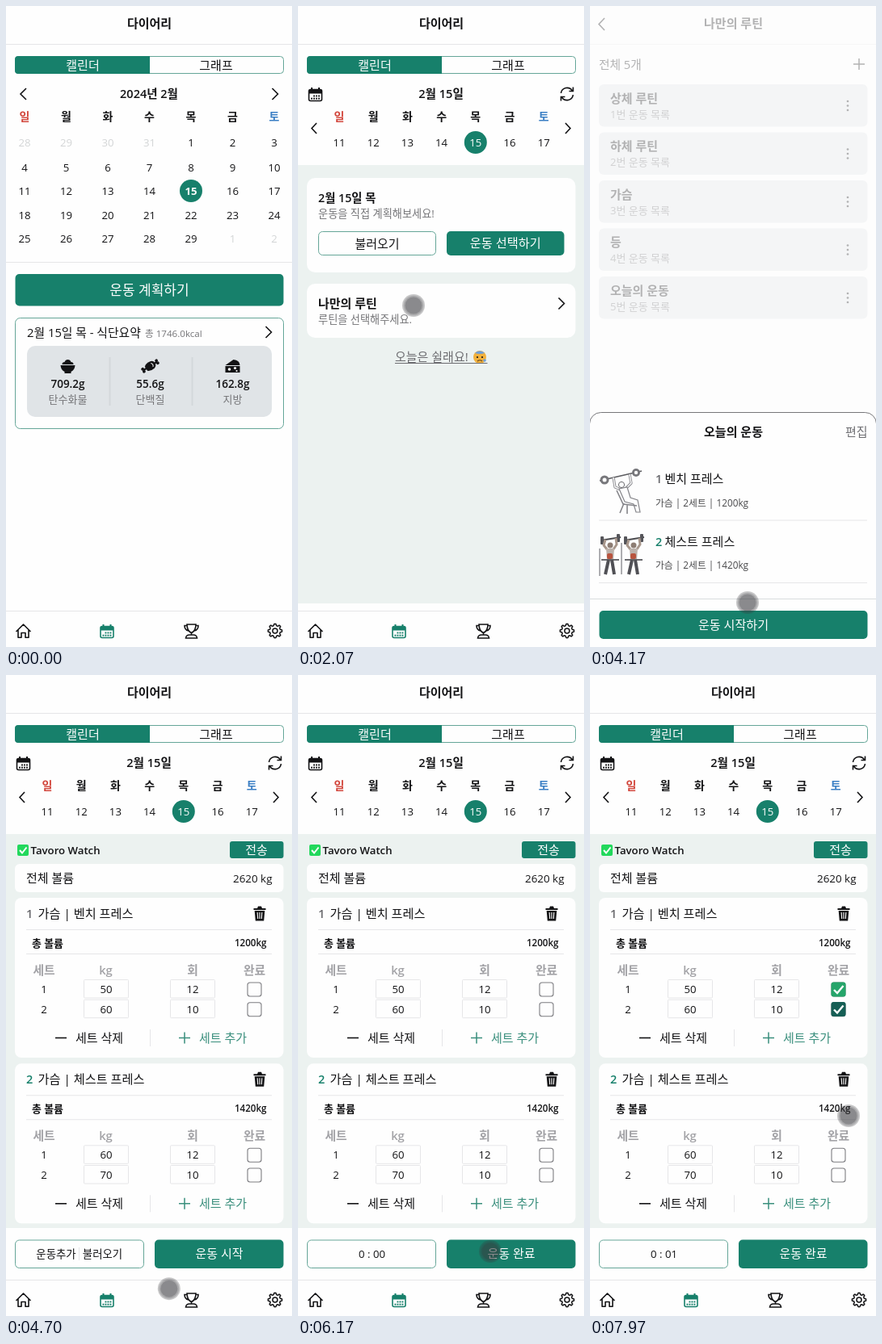
An HTML page for the animation above (8 s loop, 354 px wide and 794 px high).

```html
<!DOCTYPE html>
<html lang="ko">
<head>
<meta charset="utf-8">
<title>다이어리</title>
<style>
html, body { margin: 0; width: 100%; height: 100%; overflow: hidden; background: #fefefe; }
svg { display: block; width: 100%; height: 100%; }
text { font-family: "Open Sans", "Noto Sans CJK KR", "Noto Sans CJK", sans-serif; white-space: pre; }
</style>
</head>
<body>
<svg id="stage" viewBox="0 0 354 794"></svg>
<script>
const BG = '#fefefe', INK = '#131315', GREEN = '#17806b', EDGE = '#65a698', GREY = '#757578',
      PAGE = '#ecf2f0', SOFT = '#e0e4e7', RULE = '#e6e6e8', PALE = '#d3d5d6';
const LOOP = 8000;

// Drawing helpers
const text = (s, x, y, size = 15, fill = INK, weight = 400, anchor = 'start') =>
  `<text x="${x}" y="${y}" font-size="${size}" fill="${fill}" font-weight="${weight}" text-anchor="${anchor}">${s}</text>`;
const mid = (s, x, y, size, fill, weight) => text(s, x, y, size, fill, weight, 'middle');
const end = (s, x, y, size, fill, weight) => text(s, x, y, size, fill, weight, 'end');
const rect = (x, y, w, h, r = 0, fill = BG, stroke = 'none', sw = 1) =>
  `<rect x="${x}" y="${y}" width="${w}" height="${h}" rx="${r}" fill="${fill}" stroke="${stroke}" stroke-width="${sw}"/>`;
const line = (d, stroke = INK, sw = 1.6, extra = '') =>
  `<path d="${d}" fill="none" stroke="${stroke}" stroke-width="${sw}" ${extra}/>`;
const shape = (d, fill = INK) => `<path d="${d}" fill="${fill}"/>`;
const dot = (x, y, r, fill = INK) => `<circle cx="${x}" cy="${y}" r="${r}" fill="${fill}"/>`;
const rule = (x1, x2, y, c = RULE) => line(`M${x1} ${y}H${x2}`, c, 1);
const at = (x, y, s) => `<g transform="translate(${x} ${y})">${s}</g>`;
const many = (n, f) => Array.from({ length: n }, (_, i) => f(i)).join('');
const chevron = (x, y, w, h) => line(`M${x - w / 2} ${y - h}L${x + w / 2} ${y}L${x - w / 2} ${y + h}`);
const button = (s, x, y, w, h, baseline, size = 15) =>
  rect(x, y, w, h, 5, GREEN) + mid(s, x + w / 2, baseline, size, BG);
const plus = (x, y, r, c) => line(`M${x - r} ${y}h${2 * r}M${x} ${y - r}v${2 * r}`, c, 1.5);

// Icons, centred on 0,0
const gearPath = 'M' + Array.from({ length: 48 }, (_, i) => {
  const a = i * Math.PI / 24, r = 7.6 + 1.1 * Math.tanh(2.5 * Math.cos(8 * a));
  return (r * Math.cos(a)).toFixed(2) + ' ' + (r * Math.sin(a)).toFixed(2);
}).join('L') + 'Z';
const gear = line(gearPath, INK, 1.5) + `<circle r="3" fill="none" stroke="${INK}" stroke-width="1.5"/>`;
const home = line('M-9 1L0 -8L9 1M-6.5 -1V8.3H-2.5V2.5H2.5V8.3H6.5V-1', INK, 1.6, 'stroke-linejoin="round"');
const trophy = line('M-5.5 -8H5.5Q5.5 0 0 2.5Q-5.5 0 -5.5 -8ZM-5.5 -6.5H-8.5Q-8.5 -1 -3.5 0M5.5 -6.5H8.5Q8.5 -1 3.5 0M0 2V5M-7 9Q-6.5 5 -2.5 5H2.5Q6.5 5 7 9Z', INK, 1.6);
const calendar = c => rect(-8, -6.5, 16, 14, 2, 'none', c, 1.6) + rect(-8, -6.5, 16, 5, 1, c) +
  line('M-4.5 -9V-5M4.5 -9V-5', c, 2) +
  many(7, i => rect(-5.5 + (i + 1) % 4 * 3, i < 3 ? .5 : 3.7, 1.9, 1.9, 0, c));
const refresh = line('M-7.5 -1A7.6 7.6 0 0 1 6.5 -4M7.5 1A7.6 7.6 0 0 1 -6.5 4M7.5 -8.5V-3.5H2.5M-7.5 8.5V3.5H-2.5');
const trash = shape('M-7.5 -6.5H-3L-2 -9H2L3 -6.5H7.5V-4.5H-7.5ZM-6.3 -3.5H6.3L5.2 9H-5.2Z') +
  line('M-2.8 -1.5L-2.3 6.5M0 -1.5V6.5M2.8 -1.5L2.3 6.5', BG, 1.1);
const rice = shape('M-9 -1H9Q8.5 5 4 7V9H-4V7Q-8.5 5 -9 -1ZM-7 -2Q-7 -5 -4 -5Q-3 -8 0 -8Q3 -8 4 -5Q7 -5 7 -2Z');
const meat = `<g transform="rotate(-32)">${shape('M-6 -3Q-3 -6 3 -5Q7 -4 7 0Q7 4 3 5Q-3 6 -6 3Z')}` +
  line('M-10 0H10', INK, 2.4) + dot(-10, -1.7, 1.9) + dot(-10, 1.7, 1.9) + dot(10, -1.7, 1.9) + dot(10, 1.7, 1.9) +
  line('M2.5 -2.5Q5 0 2.5 2.5', BG, 1) + '</g>';
const cheese = shape('M-9 -1L1 -8Q9 -7 9 -1ZM-9 0H9V8H-9Z') + dot(-4, 4, 1.8, BG) + dot(3, 2.5, 1.6, BG) + dot(5, 6, 1.1, BG);

// Shared parts
const head = title => mid(title, 177.5, 27, 15, INK, 600) + rule(0, 354, 47.5);
const nav = rect(0, 749, 354, 45) + rule(0, 354, 749.5) +
  at(21.5, 774, home) + at(125, 775, calendar(GREEN)) + at(229.5, 774, trophy) + at(333, 774, gear);
const tabs = rect(11.5, 62.5, 332, 21, 4, BG, EDGE) +
  shape('M15 62H178V84H15Q11 84 11 80V66Q11 62 15 62Z', GREEN) +
  mid('캘린더', 95, 78.5, 15, BG) + mid('그래프', 260, 78.5);
const weekdays = (x, step) => [...'일월화수목금토'].map((d, i) =>
  mid(d, x + i * step, 141.5, 14, i == 0 ? '#d2463c' : i == 6 ? '#3b7fc4' : INK, 600)).join('');

const month = head('다이어리') + tabs + chevron(21.5, 109, -7, 7) + chevron(333, 109, 7, 7) +
  mid('2024년 2월', 177, 114, 14.5, INK, 600) + weekdays(23, 51.5) + dot(229, 229, 14, GREEN) +
  many(35, i => {
    const day = i - 3, out = day < 1 || day > 29, today = day == 15;
    return mid(day < 1 ? day + 31 : day > 29 ? day - 29 : day, 23 + i % 7 * 51.5,
      [174, 205, 234, 264, 293][i / 7 | 0], 13.2, today ? BG : out ? PALE : INK, today ? 700 : 400);
  }) +
  rule(0, 354, 317.5) + button('운동 계획하기', 11.5, 332, 332, 39.5, 358, 17) +
  rect(11.5, 386.5, 332, 137, 6, BG, EDGE) +
  text('2월 15일 목 - 식단요약', 26, 409.5, 14.8) + text('총 1746.0kcal', 172, 409.5, 11.6, GREY) +
  chevron(325, 404, 7, 7) + rect(26, 421, 303, 88, 10, SOFT) +
  [['709.2g', '탄수화물', rice], ['55.6g', '단백질', meat], ['162.8g', '지방', cheese]].map(([v, s, icon], i) => {
    const x = 76.5 + i * 102;
    return at(x, 446, icon) + mid(v, x, 473, 13.5, INK, 600) + mid(s, x, 492, 13, GREY);
  }).join('') + line('M128.5 435V495M230.5 435V495', '#d3d8db', 2) + nav;

const weekTop = head('다이어리') + tabs + at(21.5, 110, calendar(INK)) +
  mid('2월 15일', 177, 114, 14.6, INK, 600) + at(333, 109, refresh) +
  weekdays(51, 42.2) + chevron(20, 151.5, -6, 6.5) + chevron(334, 151.5, 6, 6.5) + dot(219.8, 169, 14, GREEN) +
  many(7, i => mid(11 + i, 51 + i * 42.2, 174, 13.2, i == 4 ? BG : INK));

const sweat = dot(225, 435, 8, '#f2b13c') + shape('M219 430A8 8 0 0 1 231 430Q225 432 219 430Z', '#6f9fd8') +
  dot(222, 435, 1.1) + dot(228, 435, 1.1) + line('M222 440Q225 437.5 228 440', '#5d4420', 1.2) + dot(231, 439, 1.8, '#6f9fd8');
const plan = weekTop + rect(0, 197, 354, 543, 0, PAGE) + rect(11, 213, 332.5, 117, 10) +
  text('2월 15일 목', 25, 242.5, 14.3, INK, 600) + text('운동을 직접 계획해보세요!', 25, 262, 13.2, GREY) +
  rect(25.5, 279.5, 145, 29, 5, BG, EDGE) + mid('불러오기', 98, 299.5) +
  button('운동 선택하기', 184, 279, 145.5, 30, 299, 15.2) +
  rect(11, 344, 332.5, 67, 10) + text('나만의 루틴', 25, 374, 15, INK, 600) +
  text('루틴을 선택해주세요.', 25, 392.5, 13.2, GREY) + chevron(326, 368.5, 7, 7) +
  text('오늘은 쉴래요!', 120, 440, 15, '#6c6c70') + sweat + rule(120, 234.5, 442.5, '#6c6c70') + nav;

const list = head('나만의 루틴') + chevron(14.5, 22.5, -7, 7.5) + text('전체 5개', 11, 77.5, 14.7) + plus(333, 72, 7) +
  ['상체 루틴', '하체 루틴', '가슴', '등', '오늘의 운동'].map((s, i) => at(0, i * 59.5,
    rect(11, 97, 332.5, 52.5, 6, SOFT) + text(s, 25, 119.5, 15, INK, 600) +
    text(`${i + 1}번 운동 목록`, 25, 138.5, 13, GREY) + many(3, k => dot(319, 118 + k * 5.5, 1.35)))).join('') + nav;

const bench = line('M12 588L64 576', '#5c5c60', 1.6) + dot(18, 587, 5.5, '#77777b') + dot(18, 587, 2.5, BG) +
  dot(57, 578, 5, '#77777b') + dot(57, 578, 2.2, BG) +
  line('M29 584L31 596L38 599M49 580L51 591L45 597', '#85858a', 3.2, 'stroke-linejoin="round"') +
  line('M29 584L31 596L38 599M49 580L51 591L45 597', BG, 1.4) +
  `<path d="M36 598L46 596L50 609L59 612L62 627H57L54 617L43 614Z" fill="${BG}" stroke="#85858a" stroke-width="1.2"/>` +
  line('M33 600L41 617L58 619M42 616L37 628M46 617V629', '#85858a', 1.6) +
  `<circle cx="39" cy="593" r="3.6" fill="${BG}" stroke="#6c6c70"/>`;
const lifter = (x, y) => at(x, y, line('M-12 -15L13 -19', '#4a4a4e', 1.8) + rect(-12, -20, 4, 10, 1, '#55555a') + rect(8, -23, 4, 10, 1, '#55555a') +
  line('M-4 -4L-8 -9L-6 -16M4 -4L8 -10L7 -18', '#a8978c', 3) + dot(0, -9, 3.5, '#8d7d74') +
  shape('M-5 -5H5L4 9H-4Z', '#bcb2ac') + rect(-4, 1, 7, 7, 2, '#b8543f') +
  line('M-11 9H11', '#6a6a6e', 2) + line('M-2 9L-6 27M2 9L5 27', '#505055', 4));
const press = lifter(25, 677) + lifter(54, 677) + line('M12 672V706M39 665V704', '#9a9a9e', 1.6);
const entry = (n, name, kg, y, c) => text(n, 81, y, 14.5, c, 600) + text(name, 92.5, y) +
  text(`가슴 | 2세트 | ${kg}kg`, 81, y + 28.5, 11.8, '#4a4a4c') + rule(11, 343, y + 46);
const sheet = `<rect width="354" height="794" fill="${BG}" opacity=".68"/>` +
  rect(-.5, 503.5, 355, 310, 14, BG, '#77777a') + mid('오늘의 운동', 177.5, 532.5, 15, INK, 600) +
  end('편집', 343.5, 532.5, 15, '#6f6f73') + bench + press +
  entry(1, '벤치 프레스', 1200, 591, '#66666a') + entry(2, '체스트 프레스', 1420, 668.5, GREEN) +
  rule(0, 354, 734.5, '#d9dcde') + button('운동 시작하기', 11.5, 749, 332, 35, 772, 15.1);

const workCard = (n, name, total, rows, c) => rect(11, 276, 332.5, 198, 8) +
  text(n, 25, 301, 14.5, c, 600) + text(`가슴 | ${name}`, 39.5, 301, 15.2) + at(314, 295.5, trash) +
  rule(25, 329, 315.5) + text('총 볼륨', 32, 336.5, 12.9, INK, 600) + end(total + 'kg', 322.5, 336, 11.6, INK, 600) +
  rule(25, 329, 345.5) +
  [['세트', 47], ['kg', 123.5], ['회', 231], ['완료', 307.5]].map(([s, x]) => mid(s, x, 370.5, 14.8, '#a2a2a6', 600)).join('') +
  rows.map(([kg, reps], i) => at(0, i * 24.7, mid(i + 1, 47, 394, 13.2) +
    rect(96.5, 377.5, 55, 22.5, 1, BG, RULE) + mid(kg, 124, 394, 13.2) +
    rect(203.5, 377.5, 55, 22.5, 1, BG, RULE) + mid(reps, 231, 394, 13.2) +
    rect(299, 381, 17, 17, 3, BG, '#7c7c80', 1.1))).join('') +
  line('M61 449.5H75') + text('세트 삭제', 86, 455) + line('M178.5 439V460', RULE, 1) +
  plus(221, 449.5, 7, '#3a8f7d') + text('세트 추가', 239, 455, 15, '#3a8f7d');
const work = weekTop + rect(0, 197, 354, 488, 0, PAGE) +
  rect(14, 210, 14, 14, 2, '#22d85c') + line('M17 217L20 220.5L25.5 213.5', BG, 2) +
  text('Tavoro Watch', 30.5, 222, 13.2, INK, 600) + rect(277, 206, 66.5, 21, 3, GREEN) + mid('전송', 310, 222, 15, BG) +
  rect(11, 234, 332.5, 35, 6) + text('전체 볼륨', 25, 257, 15) + end('2620 kg', 329.5, 257, 13.4) +
  workCard(1, '벤치 프레스', 1200, [[50, 12], [60, 10]], '#66666a') +
  at(0, 205.3, workCard(2, '체스트 프레스', 1420, [[60, 12], [70, 10]], GREEN)) +
  rect(0, 685, 354, 64) + rect(11.5, 700, 159, 34.5, 5, BG, EDGE) + rect(184, 699.5, 159.5, 35.5, 5, GREEN) + nav;
const ready = mid('운동추가', 62, 721.5, 13.4) + line('M90.5 709V725', RULE, 1) + mid('불러오기', 119.5, 721.5, 13.4) +
  mid('운동 시작', 264, 722, 15, BG);
const running = mid('0 : 00', 91.5, 721.5, 13.2).replace('<text', '<text id="clock"') + mid('운동 완료', 264, 722, 15, BG);
const tick = (id, y) => `<g id="${id}"><rect x="298.5" y="${y}" width="18" height="18" rx="3"/>` +
  line(`M302 ${y + 9.5}L306 ${y + 13.5}L313.5 ${y + 4.5}`, BG, 2.4) + '</g>';

// Layers with the spans in which they show
const PLAN = 1250, LIST = 2250, SHEET = 3330, WORK = 4450, START = 6150, TICK1 = 6950, TICK2 = 7400;
const layers = [
  ['month', month, 0, PLAN], ['plan', plan, PLAN, LIST], ['list', list, LIST, WORK], ['sheet', sheet, SHEET, WORK],
  ['work', work, WORK, LOOP], ['ready', ready, WORK, START], ['running', running, START, LOOP],
  ['first', tick('tick1', 380.5), TICK1, LOOP], ['second', tick('tick2', 405), TICK2, LOOP]
];
const stage = document.getElementById('stage');
stage.innerHTML = rect(0, 0, 354, 794) + layers.map(([id, s]) => `<g id="${id}">${s}</g>`).join('') +
  '<g id="touch" fill="#38383c"><circle r="14" opacity=".28"/><circle r="12.3" opacity=".2"/><circle r="10.5" opacity=".28"/></g>';
const el = id => document.getElementById(id);

// Pointer stops: time, x, y
const stops = [
  [350, 372, 420], [950, 185, 354], [1270, 185, 354], [2000, 143, 371], [2280, 143, 371], [3050, 62, 348],
  [3400, 62, 348], [4170, 195, 739], [4330, 200, 763], [4600, 200, 763], [5330, 235, 708], [6180, 238, 714],
  [6770, 319, 387], [6900, 309, 389], [7050, 309, 389], [7300, 308, 413], [7480, 308, 413], [7970, 320, 546]
];
function pointer(t) {
  const i = stops.findIndex(s => s[0] > t);
  if (i == 0) return [-40, -40];
  if (i < 0) return stops[stops.length - 1].slice(1);
  const [t0, x0, y0] = stops[i - 1], [t1, x1, y1] = stops[i];
  const p = (t - t0) / (t1 - t0), e = p * p * (3 - 2 * p);
  return [x0 + (x1 - x0) * e, y0 + (y1 - y0) * e];
}

function draw(t) {
  for (const [id, , from, to] of layers) el(id).style.display = t >= from && t < to ? '' : 'none';
  el('clock').textContent = '0 : 0' + Math.max(0, Math.floor((t - START) / 1000));
  el('tick1').setAttribute('fill', t < TICK2 ? '#165f55' : '#25a56a');
  el('tick2').setAttribute('fill', '#165f55');
  el('touch').setAttribute('transform', `translate(${pointer(t).map(v => v.toFixed(2)).join(' ')})`);
}

const begin = performance.now();
function frame() {
  draw((performance.now() - begin) % LOOP);
  requestAnimationFrame(frame);
}
frame();
</script>
</body>
</html>
```
